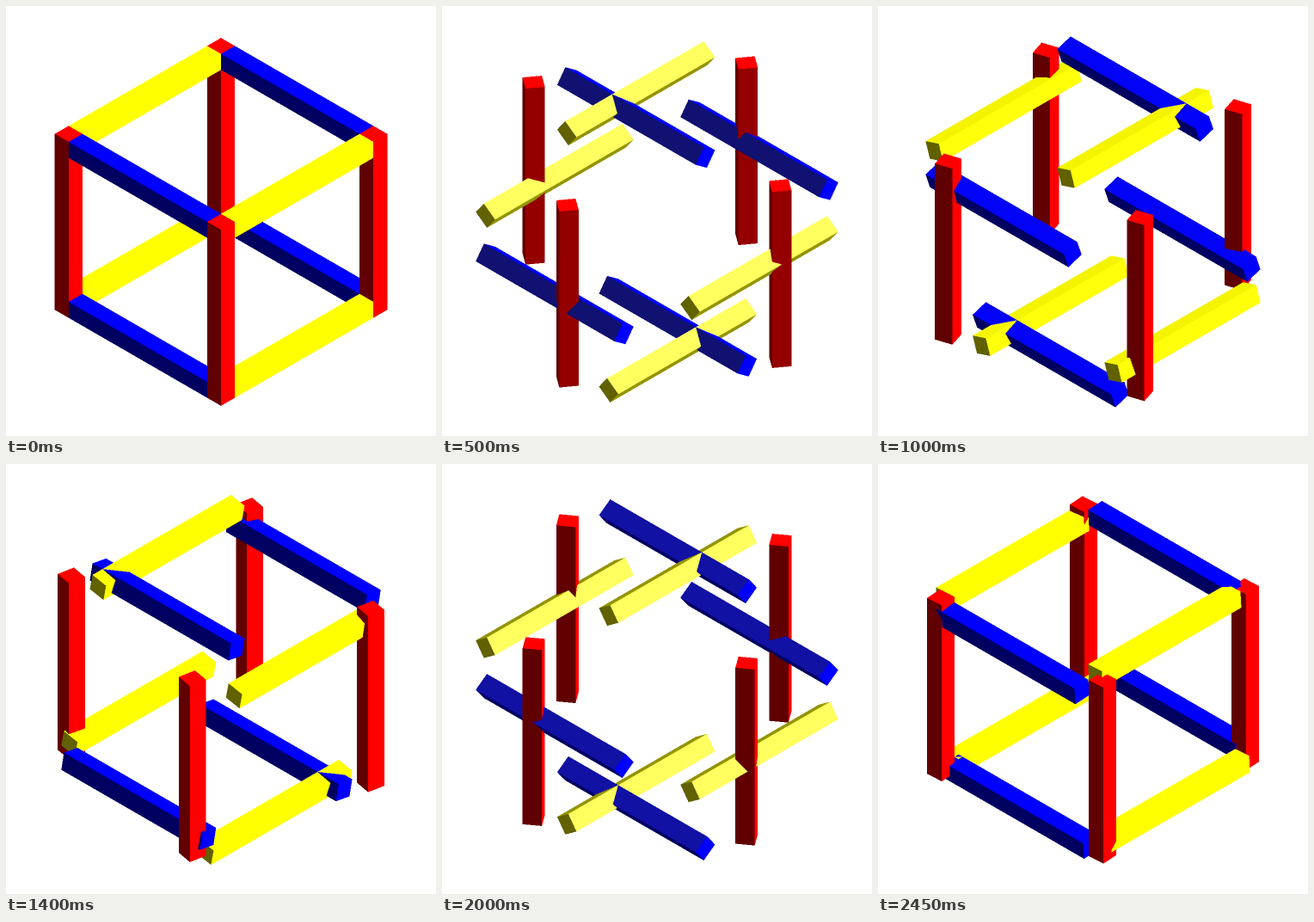
These frames come from a looping animation (500 px wide and 500 px high, 2500 ms). An HTML page with a canvas:

```html
<!DOCTYPE html>
<html lang="en">
<head>
<meta charset="utf-8">
<title>Rotating cube edges</title>
<style>
  html, body { margin: 0; width: 100%; height: 100%; overflow: hidden; background: #fff; }
  canvas { display: block; width: 500px; height: 500px; }
</style>
</head>
<body>
<canvas id="stage" width="500" height="500"></canvas>
<script>
const SIZE = 500, SAMPLES = 2, FULL = SIZE * SAMPLES;
const LOOP = 2500, STEP = 50;
const UNIT = 18.6 * SAMPLES;
const CENTER = [250 * SAMPLES, 251 * SAMPLES];

// One entry per axis x, y, z; lengths are in bar widths.
const COLORS = [[0, 0, 1], [1, 1, 0], [1, 0, 0]];
const HALF_LENGTH = [5, 5, 5.5];
const RING = [5.5, 5.5, 5];

const AMBIENT = 0.38;
const LIGHT = [0.9, -0.9, 0.9];
const HALF_MAIN = [Math.SQRT1_2, 0, Math.SQRT1_2];
const HALF_FILL = [0, Math.SQRT1_2, Math.SQRT1_2];

const ctx = document.getElementById('stage').getContext('2d');
const buffer = document.createElement('canvas');
buffer.width = buffer.height = FULL;
const bufferCtx = buffer.getContext('2d');
const image = bufferCtx.createImageData(FULL, FULL);
const pixels = new Uint32Array(image.data.buffer);
const depths = new Float32Array(FULL * FULL);

const dot = (a, b) => a[0] * b[0] + a[1] * b[1] + a[2] * b[2];
const scale = (a, f) => a.map(v => v * f);
const add = (a, b) => a.map((v, i) => v + b[i]);

// Isometric view: screen x, screen y, nearness to the viewer.
const project = ([x, y, z]) => [
  (x - y) * UNIT * Math.sqrt(3) / 2,
  ((x + y) / 2 - z) * UNIT,
  x + y + z
];

function shade(color, normal) {
  const shine = (half, amount) => amount * Math.max(0, dot(normal, half)) ** 22;
  const diffuse = AMBIENT + Math.max(0, dot(normal, LIGHT));
  const specular = shine(HALF_MAIN, 0.49) + shine(HALF_FILL, 0.085);
  const [r, g, b] = color.map(c => Math.round(255 * Math.min(1, c * diffuse + specular)));
  return (255 << 24 | b << 16 | g << 8 | r) >>> 0;
}

// Fills the parallelogram middle + s*a + t*b, with s and t in [-1, 1].
function fillFace(middle, edgeA, edgeB, color) {
  const [mx, my, mz] = project(middle);
  const [ax, ay, az] = project(edgeA);
  const [bx, by, bz] = project(edgeB);
  const det = ax * by - ay * bx;
  if (Math.abs(det) < 1e-6) return;
  const cx = CENTER[0] + mx, cy = CENTER[1] + my;
  const reachX = Math.abs(ax) + Math.abs(bx), reachY = Math.abs(ay) + Math.abs(by);
  const x0 = Math.max(0, Math.floor(cx - reachX)), x1 = Math.min(FULL - 1, Math.ceil(cx + reachX));
  const y0 = Math.max(0, Math.floor(cy - reachY)), y1 = Math.min(FULL - 1, Math.ceil(cy + reachY));
  for (let y = y0; y <= y1; y++) {
    const dy = y + 0.5 - cy;
    for (let x = x0; x <= x1; x++) {
      const dx = x + 0.5 - cx;
      const s = (dx * by - dy * bx) / det;
      if (s < -1.000001 || s > 1.000001) continue;
      const t = (ax * dy - ay * dx) / det;
      if (t < -1.000001 || t > 1.000001) continue;
      const depth = mz + s * az + t * bz, at = y * FULL + x;
      if (depth > depths[at]) {
        depths[at] = depth;
        pixels[at] = color;
      }
    }
  }
}

function drawBar(center, frame, halves, color) {
  frame.forEach((dir, i) => {
    const sign = Math.sign(dir[0] + dir[1] + dir[2]);
    const normal = scale(dir, sign);
    const j = (i + 1) % 3, k = (i + 2) % 3;
    fillFace(
      add(center, scale(normal, halves[i])),
      scale(frame[j], halves[j]),
      scale(frame[k], halves[k]),
      shade(color, normal)
    );
  });
}

// Each set of four parallel bars turns as one body around its own axis.
function drawSet(axis, angle) {
  const j = (axis + 1) % 3, k = (axis + 2) % 3;
  const c = Math.cos(angle), s = Math.sin(angle);
  const along = [0, 0, 0], u = [0, 0, 0], v = [0, 0, 0];
  along[axis] = 1;
  u[j] = c; u[k] = s;
  v[j] = -s; v[k] = c;
  for (const su of [-1, 1]) {
    for (const sv of [-1, 1]) {
      const center = add(scale(u, su * RING[j]), scale(v, sv * RING[k]));
      drawBar(center, [along, u, v], [HALF_LENGTH[axis], 0.5, 0.5], COLORS[axis]);
    }
  }
}

function render(time) {
  const angle = Math.PI * time / LOOP;
  pixels.fill(0xffffffff);
  depths.fill(-1e9);
  for (let axis = 0; axis < 3; axis++) drawSet(axis, angle);
  bufferCtx.putImageData(image, 0, 0);
  ctx.drawImage(buffer, 0, 0, SIZE, SIZE);
}

const start = performance.now();
let shown = -1;
function tick() {
  const elapsed = Math.max(0, performance.now() - start) % LOOP;
  const time = Math.floor(elapsed / STEP) * STEP;
  if (time !== shown) {
    shown = time;
    render(time);
  }
  requestAnimationFrame(tick);
}
tick();
</script>
</body>
</html>
```
